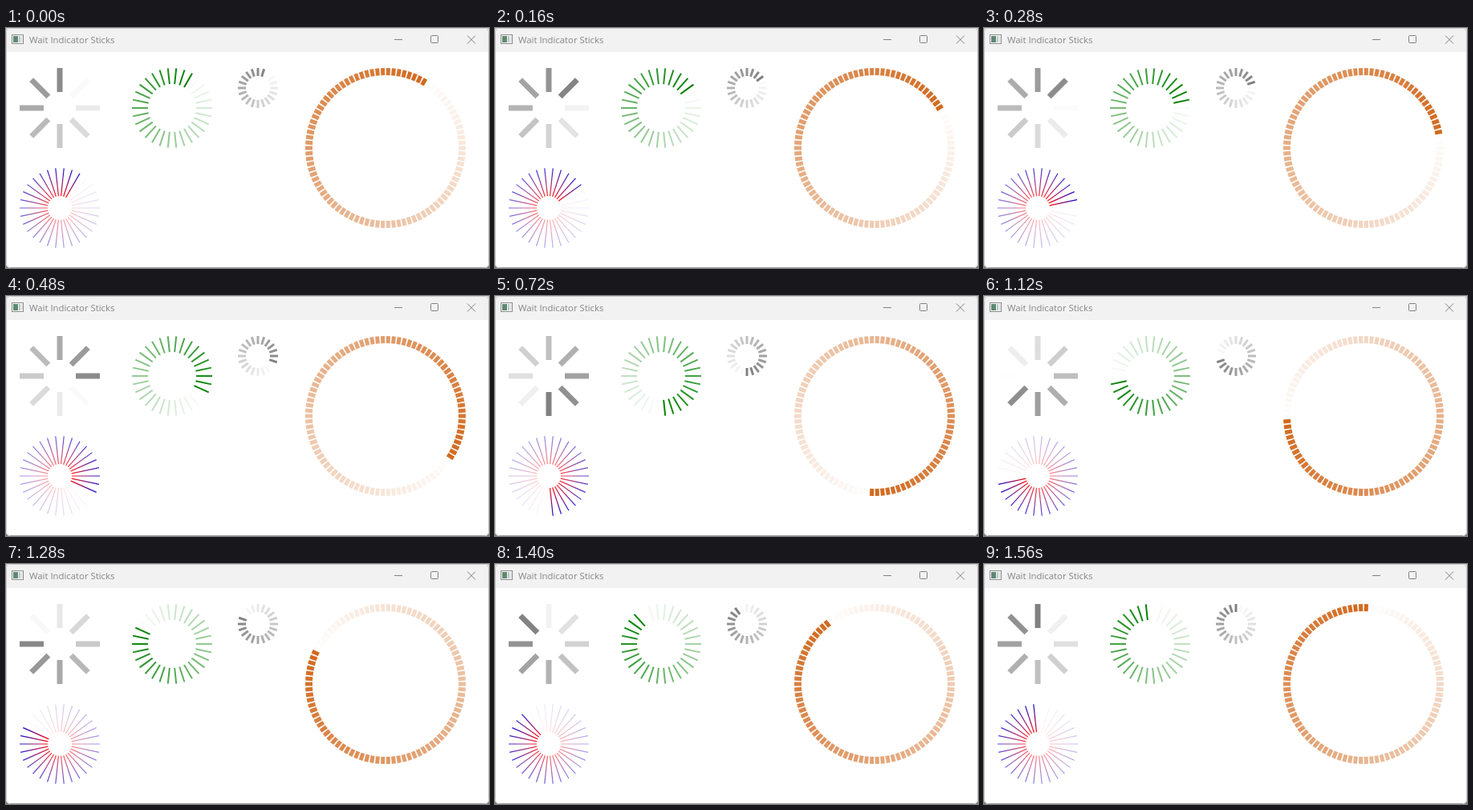
Animation, 602 px wide and 300 px high, one loop 1600 ms. Source, as an HTML page:

```html
<!DOCTYPE html>
<html lang="en">
<head>
<meta charset="utf-8">
<title>Wait Indicator Sticks</title>
<style>
  html, body { margin: 0; width: 100%; height: 100%; overflow: hidden; background: #fff; }
  svg { display: block; width: 602px; height: 300px; }
  text { font: 11.35px "Open Sans", "Noto Sans", sans-serif; fill: #858585; }
</style>
</head>
<body>
<svg id="stage" viewBox="0 0 602 300" xmlns="http://www.w3.org/2000/svg">
  <defs>
    <linearGradient id="blend" gradientUnits="userSpaceOnUse" x1="0" y1="-15" x2="0" y2="-50">
      <stop offset="0" stop-color="#ff0000"/>
      <stop offset="1" stop-color="#0800d8"/>
    </linearGradient>
    <clipPath id="frame"><rect width="602" height="300" rx="5"/></clipPath>
  </defs>
  <rect width="602" height="150" fill="#c3c8c0"/>
  <rect y="150" width="602" height="150" fill="#777"/>
  <g clip-path="url(#frame)">
    <rect width="602" height="300" fill="#fff"/>
    <rect width="602" height="30" fill="#f2f2f2"/>
  </g>
  <rect x=".5" y=".5" width="601" height="299" rx="5" fill="none" stroke="#c9cbc8"/>
  <path d="M5 299.5H597" stroke="#a0a0a0"/>

  <g id="icon">
    <rect x="7.5" y="8.5" width="14" height="11" fill="#fafafa" stroke="#8c8c8c"/>
    <rect x="9" y="10" width="6" height="8" fill="#5d8a72"/>
    <rect x="16" y="10" width="2" height="8" fill="#b9c4c4"/>
    <rect x="19" y="10" width="1.5" height="8" fill="#d5d9d9"/>
  </g>
  <text x="29" y="18.7">Wait Indicator Sticks</text>
  <g fill="none" stroke="#808080">
    <path d="M484 14.5H494"/>
    <rect x="529.5" y="9.5" width="9" height="9" rx="1"/>
    <path d="M575 9.5L585 19.5M585 9.5L575 19.5"/>
  </g>
</svg>
<script>
const NS = "http://www.w3.org/2000/svg";
const stage = document.getElementById("stage");
const LOOP = 1600, TICK = 40;

// [time in ms, sweep angle in degrees clockwise from the top]
const SWEEP = [[0, 32], [280, 80], [480, 124], [720, 184], [1120, 268], [1280, 296], [1560, 364]];

const rings = [
  { x: 67,  y: 100, count: 8,  inner: 20, outer: 50,  width: 7,   color: "#808080" },
  { x: 207, y: 100, count: 30, inner: 30, outer: 50,  width: 2,   color: "#008000" },
  { x: 314, y: 75,  count: 20, inner: 15, outer: 25,  width: 3,   color: "#808080" },
  { x: 473, y: 150, count: 90, inner: 91, outer: 100, width: 5,   color: "#d2691e" },
  { x: 67,  y: 225, count: 30, inner: 15, outer: 50,  width: 1.2, color: "url(#blend)" }
];

function add(parent, tag, attrs) {
  const el = document.createElementNS(NS, tag);
  for (const key in attrs) el.setAttribute(key, attrs[key]);
  return parent.appendChild(el);
}

const sticks = [];
for (const r of rings) {
  const group = add(stage, "g", {
    transform: `translate(${r.x} ${r.y})`, stroke: r.color, "stroke-width": r.width
  });
  for (let i = 0; i < r.count; i++) {
    const angle = 90 + i * 360 / r.count;
    const el = add(group, "path", {
      d: `M0 ${-r.inner}V${-r.outer}`, transform: `rotate(${angle})`
    });
    sticks.push({ el, angle });
  }
}

function sweepAt(t) {
  for (let i = 1; i < SWEEP.length; i++) {
    const [t0, a0] = SWEEP[i - 1], [t1, a1] = SWEEP[i];
    if (t <= t1) return a0 + (a1 - a0) * (t - t0) / (t1 - t0);
  }
  return SWEEP[SWEEP.length - 1][1];
}

// Each stick fades linearly with its angular distance behind the sweep.
function draw(ms) {
  const sweep = sweepAt(Math.floor(ms % LOOP / TICK) * TICK);
  for (const { el, angle } of sticks) {
    const lag = (sweep - angle + 720) % 360;
    el.setAttribute("opacity", (1 - lag / 360).toFixed(4));
  }
}

let start = null;
function loop(now) {
  if (start === null) start = now;
  draw(Math.max(0, now - start));
  requestAnimationFrame(loop);
}
draw(0);
requestAnimationFrame(loop);
</script>
</body>
</html>
```
